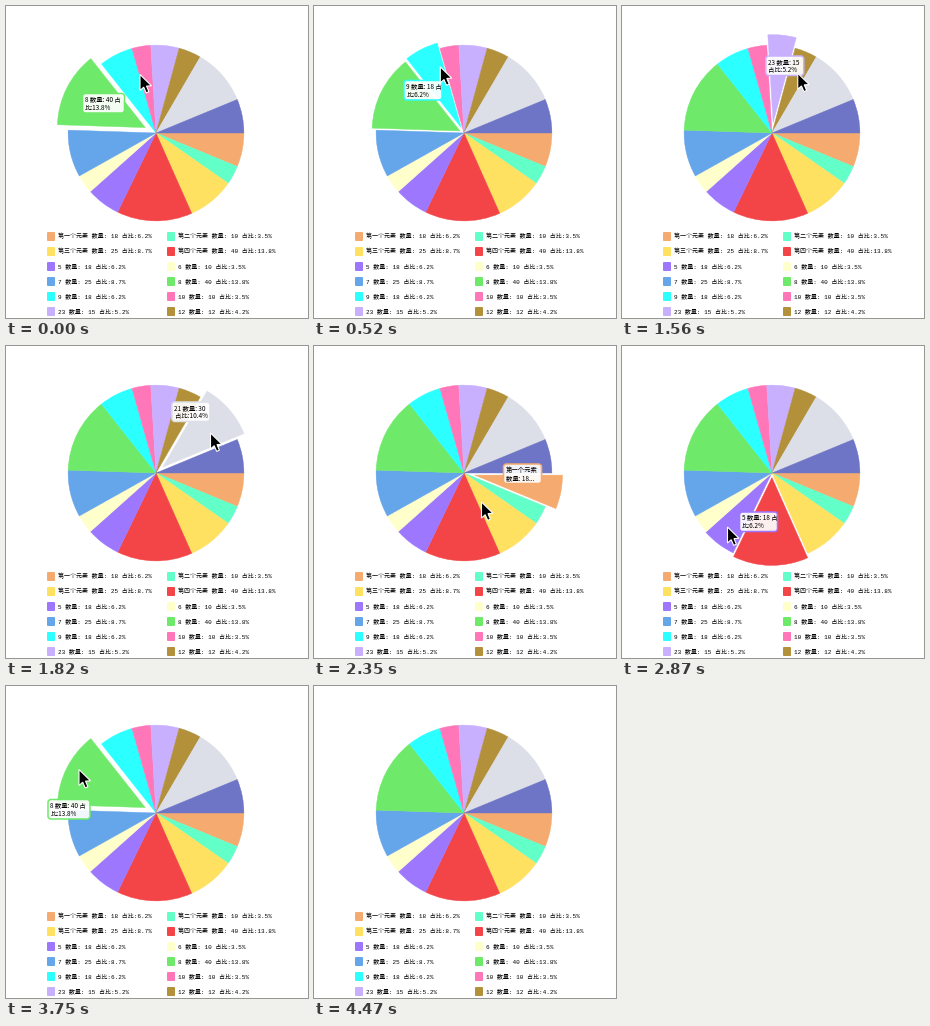
A matplotlib script that plays this animation: 302x312 px, repeating every 4.93 s.

```python
import numpy as np
import matplotlib.pyplot as plt
from matplotlib.animation import FuncAnimation
from matplotlib.patches import FancyBboxPatch, Polygon, Wedge

W, H, DPI = 302, 312, 100
FRAMES, INTERVAL = 290, 17
TICK = 87  # ms between visible refreshes
CENTER, RADIUS = np.array([150, 127]), 87.9
PULL, GLIDE = 12, 4  # slice offset in pixels, ticks to get there
CJK = "Noto Sans CJK JP"
LEGEND_FONTS = ["Liberation Mono", CJK]

ITEMS = [
    ("第一个元素", 18, "#f5ab6f"), ("第二个元素", 10, "#63ffc8"),
    ("第三个元素", 25, "#ffe162"), ("第四个元素", 40, "#f34447"),
    ("5", 18, "#9d78ff"), ("6", 10, "#ffffcc"),
    ("7", 25, "#65a5e9"), ("8", 40, "#6fe96a"),
    ("9", 18, "#2bffff"), ("10", 10, "#ff77b8"),
    ("23", 15, "#c8b0ff"), ("12", 12, "#b3913b"),
    ("21", 30, "#dcdfe7"), ("14", 18, "#6e74c6"),
]
TOTAL = sum(value for _, value, _ in ITEMS)

# hovered item, tick entered, tick left
VISITS = [(7, -GLIDE, 3.5), (8, 4, 10.5), (10, 10.5, 16.5), (12, 18, 22.5),
          (0, 23.4, 29), (3, 29.7, 30.5), (4, 32.7, 36.5), (7, 38, 44)]
# tick, x, y
CURSOR_PATH = [(0, 134, 68.5), (3, 123.5, 63), (10, 130, 58), (13, 147, 47.5),
               (21, 204.5, 87), (24, 208, 138), (27, 167.5, 156), (33, 105.5, 181),
               (36, 96, 188), (43, 73, 83.5), (49, 152, 169), (50, 222, 274)]
TIP_PATH = [(3, 76.5, 87.5), (13, 121.5, 44), (21, 166, 56), (27, 189.5, 118),
            (33, 117.5, 166), (43, 42, 113.5)]
TIP_END, CURSOR_END = 47, 51
ARROW = np.array([(0, 0), (0, 16), (3.7, 12.7), (6.2, 18.4), (8.9, 17.2),
                  (6.5, 11.6), (11.5, 11.3)])


def share(value):
    return f"占比:{100 * value / TOTAL:.1f}%"


def tip_lines(i):
    """Wrap the tooltip text to two short lines."""
    name, value, _ = ITEMS[i]
    if len(name) > 2:
        return name, f"数量: {value}..."
    head, text = f"{name} 数量: {value}", share(value)
    if len(name) == 2:
        return head, text
    return f"{head} {text[0]}", text[1:]


def along(path, tick):
    ticks, *coords = zip(*path)
    return np.array([np.interp(tick, ticks, c) for c in coords])


def pull(i, tick):
    """Offset of slice i: out after entering, back after leaving."""
    return PULL * max((np.clip(min(tick - enter, leave + GLIDE - tick) / GLIDE, 0, 1)
                       for item, enter, leave in VISITS if item == i), default=0)


def label(x, y, text, px, family, **kw):
    return ax.text(x, y, text, fontsize=px * 72 / DPI, family=family,
                   color="black", va="baseline", **kw)


def rounded(x, y, w, h, r, **kw):
    style = f"round,pad=0,rounding_size={r}"
    return ax.add_patch(FancyBboxPatch((x, y), w, h, boxstyle=style, **kw))


fig = plt.figure(figsize=(W / DPI, H / DPI), dpi=DPI, facecolor="white")
ax = fig.add_axes([0, 0, 1, 1])
ax.set_xlim(0, W)
ax.set_ylim(H, 0)
ax.axis("off")

slices, directions = [], []
edges = np.cumsum([0] + [value for _, value, _ in ITEMS]) * 360 / TOTAL
for (_, _, color), a, b in zip(ITEMS, edges[:-1], edges[1:]):
    slices.append(ax.add_patch(Wedge(CENTER, RADIUS, a, b, fc=color, ec=color,
                                     lw=0.3, joinstyle="round")))
    mid = np.radians((a + b) / 2)
    directions.append(np.array([np.cos(mid), np.sin(mid)]))

for i, (name, value, color) in enumerate(ITEMS[:12]):
    row, col = divmod(i, 2)
    x, y = 41 + 120 * col, 226 + 15 * row
    rounded(x, y, 8, 9, 1, fc=color, lw=0)
    label(x + 11.5, y + 6.5, f"{name} 数量: {value} {share(value)}", 6, LEGEND_FONTS)

tip = rounded(0, 0, 38, 19.5, 3, fc=(1, 1, 1, 0.92), lw=1.1, zorder=4)
lines = [label(0, 0, "", 6.4, CJK, zorder=5) for _ in range(2)]
cursor = ax.add_patch(Polygon(ARROW, fc="black", ec="white", lw=0.8, zorder=6))


def update(frame):
    tick = ((frame + 1) * INTERVAL - 1) // TICK

    for i, (wedge, way) in enumerate(zip(slices, directions)):
        wedge.set_center(CENTER + way * pull(i, tick))

    shown = tick < TIP_END
    item = [i for i, enter, _ in VISITS if enter <= tick][-1]
    texts = tip_lines(item)
    x, y = along(TIP_PATH, tick)
    tip.set_bounds(x, y, 42 if item == 7 else 38, 19.5)
    tip.set_edgecolor(ITEMS[item][2])
    tip.set_visible(shown)
    for k, line in enumerate(lines):
        line.set_text(texts[k])
        line.set_position((x + 2.5, y + 8.4 + 7.8 * k))
        line.set_visible(shown)

    cursor.set_xy(ARROW + along(CURSOR_PATH, tick))
    cursor.set_visible(tick < CURSOR_END)
    return [*slices, tip, *lines, cursor]


anim = FuncAnimation(fig, update, frames=FRAMES, interval=INTERVAL,
                     repeat=True, repeat_delay=0, blit=False)
plt.show()
```
